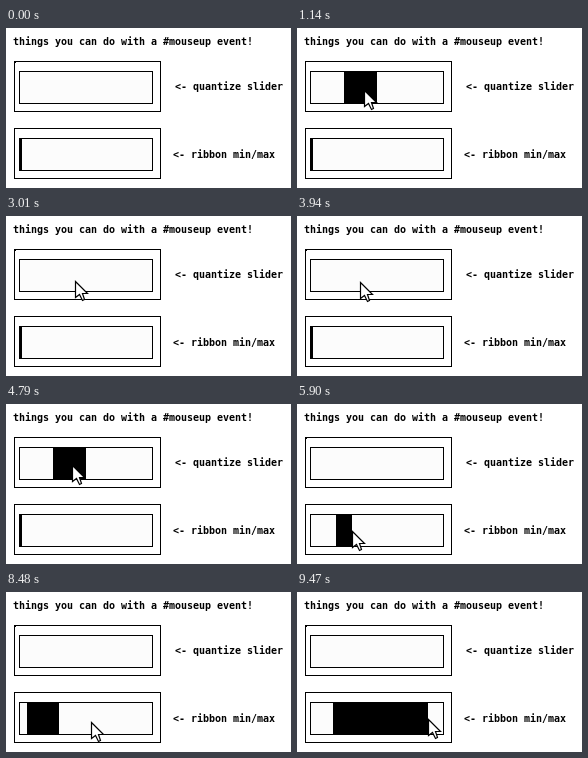
Recreate the animation shown at these times as an HTML page with a canvas. Size 285 px wide and 160 px high, loop 9.65 s.

```html
<!DOCTYPE html>
<html lang="en">
<head>
<meta charset="utf-8">
<title>mouseup sliders</title>
<style>
  html, body { margin: 0; width: 100%; height: 100%; overflow: hidden; background: #fff; }
  canvas { display: block; }
</style>
</head>
<body>
<canvas id="stage" width="285" height="160"></canvas>
<script>
const ctx = document.getElementById('stage').getContext('2d');
const LOOP = 9650, SHOW = 500, TO_RIBBON = 5130;
const LEFT = 14, CELL = 33, CELLS = 4, TRACK = 32;

// The gesture is a chain of eased legs; the button keeps its state until the next leg.
const legs = [];

function travel(held, start, end, y, stops) {
  const step = (end - start) / stops.length;
  stops.forEach((x, i) => legs.push({ held, start: start + i * step, step, x, y }));
}
const move = (start, end, y, ...stops) => travel(false, start, end, y, stops);
const drag = (start, end, y, ...stops) => travel(true, start, end, y, stops);
const button = (held, start) => legs.push({ ...legs[legs.length - 1], held, start });

// Slider
move(SHOW, 850, 62, 60);
button(true, 850);
drag(1060, 1460, 61, 130);
drag(1620, 1940, 63, 67);
drag(2140, 2700, 65, 92, 69);
button(false, 2700);
drag(3080, 3660, 67, 95, 51);
move(3850, 4260, 59, 143);
drag(4440, 4800, 61, 66);

// Ribbon
move(TO_RIBBON, 5570, 127, 39);
drag(5730, 6140, 127, 82);
move(6370, 6620, 128, 69);
drag(6620, 7050, 129, 131);
move(7360, 7680, 130, 53);
drag(7680, 7980, 130, 21);
move(8220, 8640, 130, 115);
button(true, 8720);
drag(8920, 9470, 127, 36, 131);

const ease = u => u * u * (3 - 2 * u);
const mix = (a, b, u) => a + (b - a) * u;

function stateAt(t) {
  let x = 110, y = 73, held = false, lo = LEFT, hi = LEFT + 2;
  for (const leg of legs) {
    if (leg.start > t) break;
    const onRibbon = leg.held && leg.start > TO_RIBBON;
    if (onRibbon && !held) lo = hi = x;
    const u = ease(Math.min(1, (t - leg.start) / leg.step));
    x = mix(x, leg.x, u);
    y = mix(y, leg.y, u);
    held = leg.held;
    if (onRibbon) {
      lo = Math.min(lo, x);
      hi = Math.max(hi, x);
    }
  }
  const [px, py, min, max] = [x, y, lo, hi].map(Math.round);
  return { x: px, y: py, held, min, max: Math.max(min + 1, max) };
}

function fill(color, x, y, w, h) {
  ctx.fillStyle = color;
  ctx.fillRect(x, y, w, h);
}

function frame(y) {
  ctx.strokeStyle = '#000';
  ctx.lineWidth = 1;
  ctx.strokeRect(8.5, y + 0.5, 146, 50);
  fill('#fcfcfc', 13, y + 10, 134, 33);
  ctx.strokeRect(13.5, y + 10.5, 133, 32);
}

function label(text, x, y) {
  ctx.fillStyle = '#000';
  ctx.font = 'bold 10px "DejaVu Sans Mono", monospace';
  ctx.letterSpacing = '-0.02px';
  ctx.fillText(text, x, y);
}

function drawCursor(x, y) {
  const shape = [[0, 0], [0, 16], [4, 13], [7, 19], [9, 18], [7, 12], [12, 12]];
  ctx.beginPath();
  for (const [dx, dy] of shape) ctx.lineTo(x + 0.5 + dx, y + 0.5 + dy);
  ctx.closePath();
  ctx.fillStyle = '#fff';
  ctx.fill();
  ctx.lineWidth = 1.2;
  ctx.stroke();
}

function draw(t) {
  const { x, y, held, min, max } = stateAt(t);
  fill('#fff', 0, 0, 285, 160);
  label('things you can do with a #mouseup event!', 7, 17);
  label('<- quantize slider', 169, 62);
  label('<- ribbon min/max', 167, 130);
  frame(33);
  frame(100);

  if (held && t < TO_RIBBON) {
    const cell = Math.min(CELLS - 1, Math.floor((x - LEFT) / CELL));
    fill('#000', LEFT + cell * CELL, 44, CELL, TRACK);
  } else {
    fill('#000', 9, 34, 1, 1);
  }
  fill('#000', min, 111, max - min, TRACK);
  if (t >= SHOW) drawCursor(x, y);
}

const start = performance.now();
function tick() {
  draw((performance.now() - start) % LOOP);
  requestAnimationFrame(tick);
}
tick();
</script>
</body>
</html>
```
